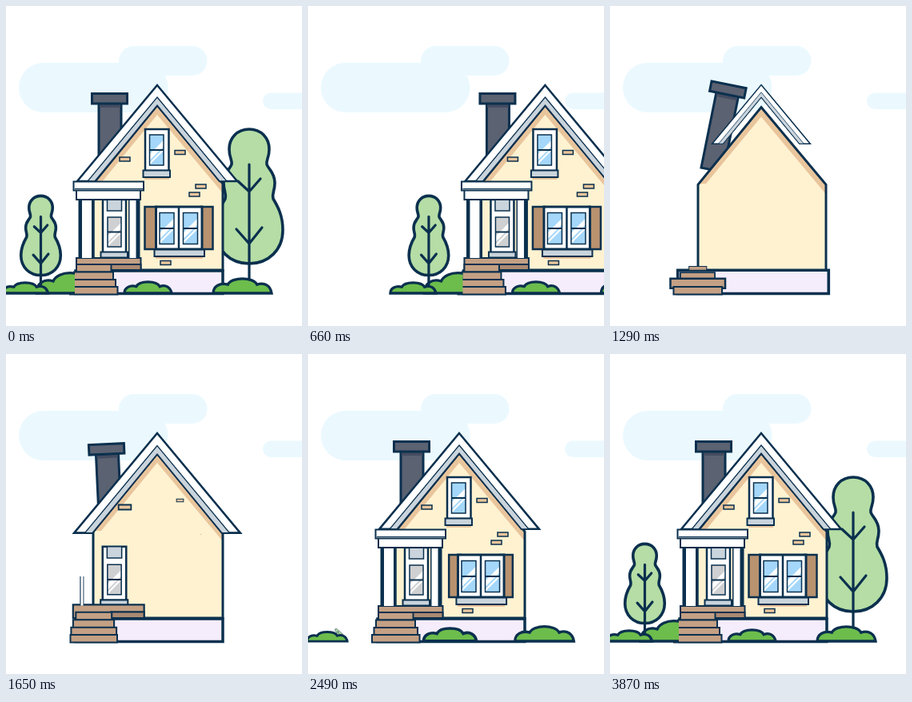
Recreate the animation shown at these times as an HTML page. Size 370x400 px, loop 3900 ms.

```html
<!DOCTYPE html>
<html lang="en">
<head>
<meta charset="utf-8">
<title>House</title>
<style>
  html, body { margin: 0; width: 100%; height: 100%; overflow: hidden; background: #fff; }
  svg { display: block; }
</style>
</head>
<body>
<svg id="stage" width="370" height="400" viewBox="0 0 370 400"></svg>
<script>
const LOOP = 3900, SLIDE = 1000;
const INK = '#0b304e', WHITE = '#fff', CREAM = '#fff2d1', TAN = '#e9c59c', WOOD = '#c4a084',
      STONE = '#cad4dc', SLATE = '#5b6272', LEAF = '#b5dda5', BUSH = '#6cbd4c', GLASS = '#a4d7fa';

// Drawing helpers
const path = (d, fill, w = 2.5) =>
  `<path d="${d}" fill="${fill}" ${w ? `stroke="${INK}" stroke-width="${w}"` : ''}/>`;
const box = (x, y, w, h, fill, line) => path(`M${x} ${y}h${w}v${h}h${-w}z`, fill, line);
const pill = (x, y, w, h) => `<rect x="${x}" y="${y}" width="${w}" height="${h}" rx="${h / 2}" fill="#ebf9ff"/>`;

// Two panes crossed by slanted reflections
function sash(x, y, w, h, tint = GLASS) {
  const gleam = (top, size) => path(`M${x} ${y + top * h}l${w} ${-w}v${size * h}l${-w} ${w}z`, WHITE, 0);
  return box(x, y, w, h, tint, 0) + gleam(.64, .2) + gleam(.91, .08) +
    box(x, y, w, h, 'none', 1.5) + path(`M${x} ${y + h / 2}h${w}`, 'none', 2);
}

function bush(cx, w, h) {
  const p = (x, y) => `${cx + x * w} ${359 - y * h}`;
  return path(`M${p(-.5, 0)}C${p(-.5, .5)} ${p(-.38, .75)} ${p(-.25, .6)}C${p(-.18, 1.15)} ${p(.18, 1.15)} ` +
    `${p(.25, .6)}C${p(.38, .8)} ${p(.48, .5)} ${p(.5, 0)}z`, BUSH, 3.3);
}

// A symmetric three-lobed crown with trunk and branches; the base is at (cx, base)
function tree(cx, base, s) {
  const half = [[0, -201], [15, -201], [25, -190], [25, -176], [25, -165], [21, -163], [22, -157],
    [24, -151], [32, -147], [32, -134], [32, -123], [28, -121], [30, -114],
    [36, -104], [42, -93], [42, -75], [42, -50], [24, -33], [0, -33]];
  const round = [...half.slice(1), ...half.slice(0, -1).reverse().map(([x, y]) => [-x, y])];
  return `<g transform="translate(${cx} ${base}) scale(${s})" stroke-linecap="round">` +
    path(`M${half[0]}C${round.join(' ')}z`, LEAF, 3.6 / s) +
    path('M0 0V-157M-14 -136L0 -123L14 -139M-16 -76L0 -58L16 -78', 'none', 3.2 / s) + '</g>';
}

// Elastic settle from 0 to 1
function elastic(u, p) {
  if (u >= 1) return 1;
  return 1 + 2 ** (-10 * u) * Math.sin((u - p / 4) * 2 * Math.PI / p);
}

// Ways for a part to appear, given progress k and its anchor
const scaled = (x, y, sx, sy) => `translate(${x} ${y}) scale(${sx} ${sy}) translate(${-x} ${-y})`;
const grow = (k, x, y) => scaled(x, y, k, k);
const rise = (k, x, y) => scaled(x, y, Math.min(1, k * k), k);
const sway = (k, x, y) => `rotate(${(k - 1) * 45} ${x} ${y}) ` + grow(Math.min(1, k), x, y);
const swing = (k, x, y) => `rotate(${(1 - k) * 60} ${x} ${y})`;
const slide = dir => k => `translate(${dir * 14 * (1 - k)} 0)`;

const parts = [];
const add = (start, x, y, art, { dur = 1000, p = .3, move = grow } = {}) =>
  parts.push({ start, x, y, art, dur, p, move });

add(2600, 304, 355, tree(304, 355, 1), { dur: 1225, p: .5, move: sway });
add(1230, 195, 200, box(116, 122, 28, 96, SLATE, 3) + box(117, 123, 26, 4, '#434c60', 0) +
  box(107.5, 109.5, 44, 12.5, SLATE, 3), { move: swing });
add(970, 179, 360, box(87, 331, 184, 28.5, '#f5edfb', 3.5), { dur: 660 });
add(975, 190, 330,
  path('M189 124L271 222V330H109V222z', CREAM, 0) +
  path('M189 124L271 222V234L189 136L119 221H109z', TAN, 0) +
  path('M189 124L271 222V330H109V222z', 'none', 3), { dur: 570 });

[[142, 189], [211, 180.5], [237, 223], [229, 233], [193, 318.5]].forEach(([x, y], i) =>
  add(1585 + 30 * i, x + 6.5, y + 2.5, box(x, y, 13, 5, TAN, 1.5), { dur: 700 }));

// Attic window
add(1800, 188.5, 206, box(174, 154, 29.5, 52, WHITE) + sash(179.5, 161, 17.5, 38), { dur: 700 });
add(1870, 188.5, 210, box(173, 214, 31, 3, TAN, 0) + box(171.5, 205.5, 33.5, 8.5, STONE, 2), { dur: 700 });

// Roof
add(1197, 189, 98,
  path('M189 99L289 219H267L189 124L111 219H89z', WHITE) +
  path('M189 114L276 219H267L189 124L111 219H102z', STONE, 1.3), { dur: 1330, p: .5 });

// Door
add(1380, 135.5, 314, box(121, 242, 29, 72, WHITE) + box(126.5, 242, 18, 14, STONE, 1.5) +
  sash(127, 264, 17, 37, '#cfd0d2') + box(118.5, 307.5, 33.5, 7, STONE, 2), { dur: 700 });

// Porch floor and steps
add(1447, 128.5, 330, box(88, 315, 80.5, 15, WOOD, 2) + box(131, 323, 37.5, 7, '#ac8a72', 2));
[[88, 323, 43.5, 1250], [85, 332.5, 49, 1225], [82.5, 342, 54.5, 1190], [80, 351, 59.5, 1070]]
  .forEach(([x, y, w, start]) => add(start, x + w / 2, y + 5, box(x, y, w, 9.5, WOOD, 2)));

// Porch columns and roof
add(1593, 93, 314, box(92, 242, 17, 73, WHITE, 0) + box(90.5, 242, 4.5, 73, INK, 0) +
  box(107, 242, 3.5, 73, INK, 0), { p: .5, move: rise });
add(1650, 165, 314, box(154, 242, 10, 73, WHITE, 0) + box(153, 242, 1.5, 73, INK, 0) +
  box(162.5, 242, 5, 73, INK, 0), { dur: 800, p: .5, move: rise });
add(1780, 128, 230, box(88, 230, 80, 12, WHITE, 2) + box(84.5, 219.5, 87.5, 11, WHITE, 2) +
  path('M86 228.5H171', 'none', 1), { dur: 700, p: .4 });

// Front window with shutters
add(2430, 180, 278, box(173.5, 251, 15, 53, '#b9926f'), { move: slide(1) });
add(2430, 252, 278, box(243.5, 251, 15, 53, '#b9926f'), { move: slide(-1) });
add(1930, 216, 304, box(187.5, 251, 57.5, 53, WHITE, 3) + path('M216 251V304', 'none', 2.5) +
  sash(192, 258.5, 18, 39) + sash(221.5, 258.5, 18, 39), { dur: 700 });
add(2010, 216, 309, box(187, 313, 59, 3, TAN, 0) + box(185.5, 304.5, 62.5, 8.5, STONE, 2), { dur: 700 });

// Garden
add(2110, 295, 360, bush(295.5, 73, 18));
add(2290, 177, 360, bush(177.5, 59, 14));
add(2560, 80, 360, `<svg width="86" height="400">${bush(80, 84, 25)}</svg>`, { dur: 900 });
add(2475, 43.5, 355, tree(43.5, 356, .59), { p: .5, move: sway });
add(2425, 24, 360, bush(24, 57, 13));

const stage = document.getElementById('stage');
const clouds = pill(16, 71, 186.5, 62) + pill(141, 50, 110.5, 37) + pill(321, 108.5, 90, 20.5);
const house = parts.map(part => part.art).join('');

const build = (t, { start, x, y, art, dur, p, move }) =>
  t > start ? `<g transform="${move(elastic((t - start) / dur, p), x, y)}">${art}</g>` : '';

function draw(t) {
  const leaving = t < SLIDE ? `<g transform="translate(${372 * (t / SLIDE) ** 3} 0)">${house}</g>` : '';
  stage.innerHTML = clouds + leaving + parts.map(part => build(t, part)).join('');
}

const begin = performance.now();
function tick() {
  draw((performance.now() - begin) % LOOP);
  requestAnimationFrame(tick);
}
tick();
</script>
</body>
</html>
```
